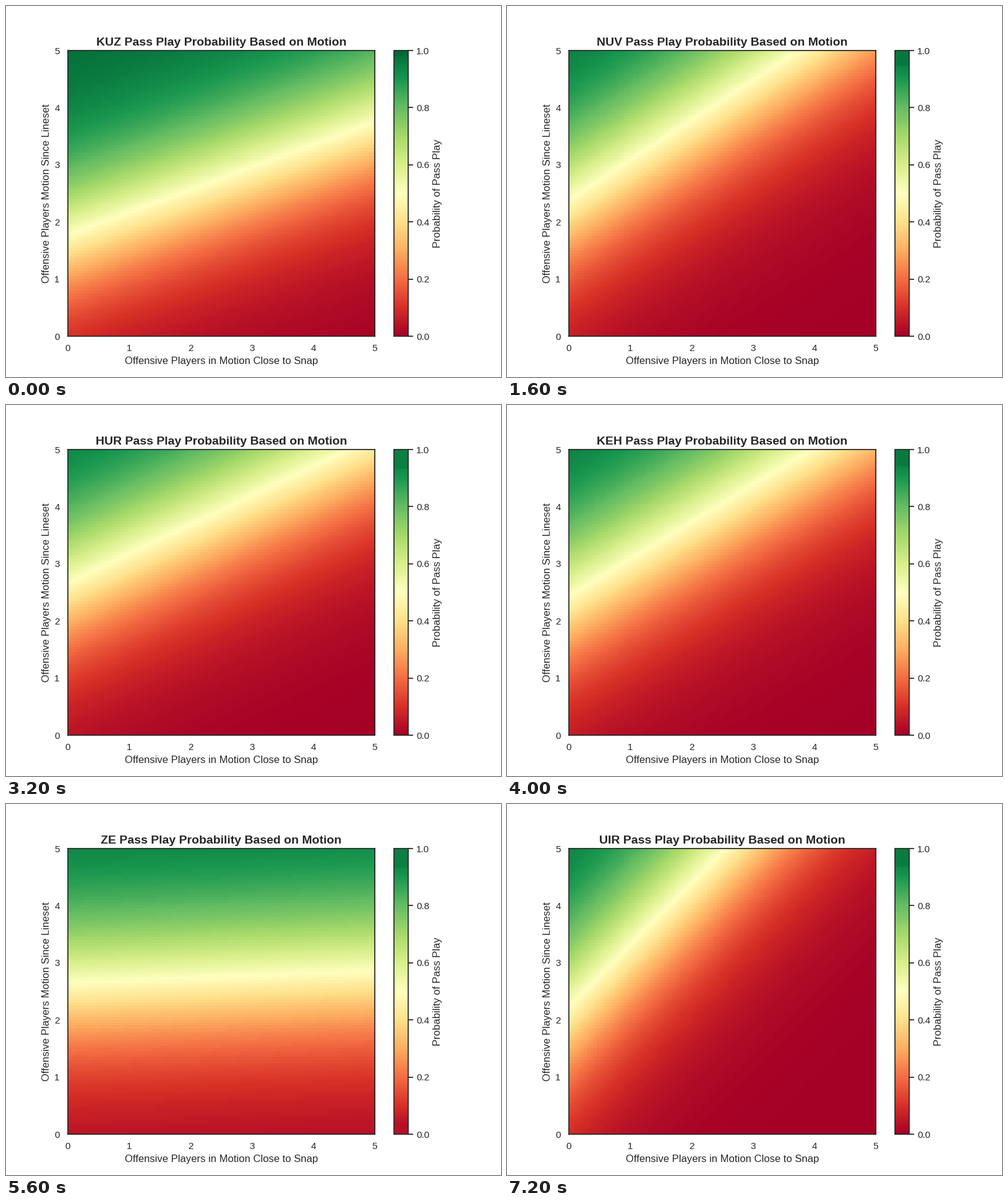
A matplotlib script for the animation above (8000 ms loop, 800 by 600 pixels).

```python
import numpy as np
import matplotlib.pyplot as plt
from matplotlib.animation import FuncAnimation

INK = "0.15"
plt.rcParams.update({
    "font.family": "Liberation Sans",
    "text.color": INK,
    "axes.labelcolor": INK,
    "axes.edgecolor": INK,
    "axes.linewidth": 1.25,
    "axes.labelsize": 12,
    "axes.titlesize": 14,
    "axes.titleweight": "bold",
    "xtick.color": INK,
    "ytick.color": INK,
    "xtick.labelsize": 11,
    "ytick.labelsize": 11,
    "xtick.major.size": 6,
    "ytick.major.size": 6,
    "xtick.major.width": 1.25,
    "ytick.major.width": 1.25,
    "xtick.bottom": False,
    "ytick.left": False,
})

# Team code, even-odds height at x = 0, slope of the even-odds line, steepness
TEAMS = [
    ("KUZ", 1.775, 0.396, 1.20),
    ("ZU", 2.23, 0.917, 0.986),
    ("NUV", 2.40, 0.70, 1.10),
    ("QU", 2.15, 1.78, 1.10),
    ("HUR", 2.68, 0.511, 1.135),
    ("KEH", 2.45, 0.65, 1.10),
    ("UKI", 2.60, 0.676, 1.33),
    ("ZE", 2.65, 0.043, 1.12),
    ("VEH", 2.35, 0.60, 1.10),
    ("UIR", 2.25, 1.09, 0.994),
]

X, Y = np.meshgrid(np.linspace(0, 5, 100), np.linspace(0, 5, 100))


def pass_probability(start, slope, steepness):
    return 1 / (1 + np.exp(-steepness * (Y - start - slope * X)))


def bar_levels(z):
    """Levels outside the plotted range share one flat shade at each end."""
    top = min(z.max() + 0.02, 1)
    return np.where(levels > z.max(), top, np.maximum(levels, z.min()))


fig, ax = plt.subplots(figsize=(8, 6), dpi=100, facecolor="white")
image = ax.imshow(np.zeros_like(X), origin="lower", extent=(0, 5, 0, 5),
                  aspect="auto", cmap="RdYlGn", vmin=0, vmax=1,
                  interpolation="nearest")
ax.set_xticks(range(6))
ax.set_yticks(range(6))
ax.set_xlabel("Offensive Players in Motion Close to Snap")
ax.set_ylabel("Offensive Players Motion Since Lineset")
title = ax.set_title("")

bar = fig.colorbar(image, ax=ax, label="Probability of Pass Play")
levels = np.array(bar.solids.get_array())


def draw(i):
    code, *fit = TEAMS[i]
    z = pass_probability(*fit)
    image.set_data(z)
    bar.solids.set_array(bar_levels(z))
    title.set_text(f"{code} Pass Play Probability Based on Motion")
    return image, bar.solids, title


anim = FuncAnimation(fig, draw, frames=len(TEAMS), interval=800, repeat=True)
plt.show()
```
